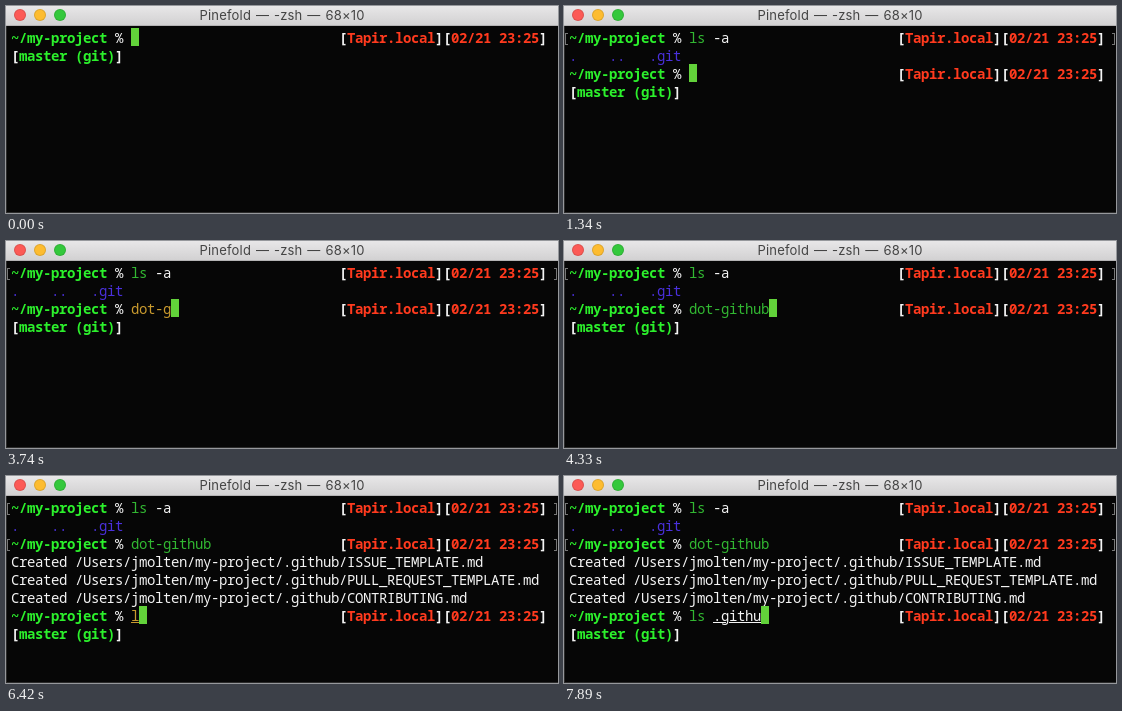
Animation of 552 by 207 pixels, one loop 8000 ms. Source, as an HTML page:

```html
<!DOCTYPE html>
<html lang="en">
<head>
<meta charset="utf-8">
<title>Shell session</title>
<style>
  html, body { margin: 0; width: 100%; height: 100%; overflow: hidden; background: #060606; }
  .window { position: relative; width: 552px; height: 207px; overflow: hidden; background: #060606; }
  .window::after {
    content: ""; position: absolute; inset: 20px 0 0; pointer-events: none;
    border: solid #2b2b2b; border-width: 0 0 1px 1px;
  }
  .bar {
    position: absolute; left: 0; top: 0; width: 552px; height: 20px; box-sizing: border-box;
    background: linear-gradient(#e8e7e8, #d2d1d2); border-bottom: 1px solid #b4b3b4;
    font: 13px/19px Inter, "Open Sans", sans-serif; letter-spacing: .2px; word-spacing: 1px;
    color: #444; text-align: center;
  }
  .dot {
    position: absolute; top: 3px; width: 12px; height: 12px; box-sizing: border-box;
    border-radius: 50%; border: 1px solid rgba(0, 0, 0, .12);
  }
  .row {
    position: absolute; left: 0; width: 552px; height: 18px; color: #f4f4f4;
    font: 500 14px/18px "Noto Sans Mono", "DejaVu Sans Mono", monospace; letter-spacing: -.4px;
    font-variant-ligatures: none; white-space: pre;
  }
  .text { position: absolute; top: 1px; }
  .bold { font-weight: 700; }
  .prompt { color: #2cf02c; font-weight: 700; }
  .info { color: #ff3a1e; }
  .cmd { color: #32b832; }
  .part { color: #c99a2e; }
  .dir { color: #4a30dc; }
  .line { text-decoration: underline 1px; text-underline-offset: 1px; }
  .cursor { position: absolute; top: 0; width: 8px; height: 18px; background: #62d23a; }
  .mark { position: absolute; top: 5px; width: 2px; height: 10px; border: 1px solid #777; }
  .mark.l { left: 1px; border-right: 0; }
  .mark.r { left: 548px; border-left: 0; }
</style>
</head>
<body>
<div class="window">
  <div class="bar">
    <i class="dot" style="left:8px;background:#fc5a56"></i>
    <i class="dot" style="left:28px;background:#fdbc30"></i>
    <i class="dot" style="left:48px;background:#34c83c"></i>
    Pinefold — -zsh — 68×10
  </div>
  <div id="screen"></div>
</div>
<script>
const LOOP = 8000, LEFT = 5, TOP = 22, CELL = 8, LINE = 18, INPUT = 15;
const screen = document.getElementById("screen");

const span = (cls, s) => `<span class="${cls}">${s}</span>`;
const text = (col, html) => `<div class="text" style="left:${LEFT + col * CELL}px">${html}</div>`;
const cursor = col => `<i class="cursor" style="left:${LEFT + col * CELL}px"></i>`;
const marks = '<i class="mark l"></i><i class="mark r"></i>';

// Command colouring as the shell highlights it while typing
function highlight(s) {
  if (!s) return "";
  const [, word, gap, arg] = s.match(/^(\S+)(\s*)(.*)$/);
  const known = word === "ls" || word === "dot-github";
  const cls = known ? "cmd" : word.length === 1 ? "part line" : "part";
  return span(cls, word) + gap + (arg[0] === "." ? span("line", arg) : arg);
}

const prompt = s =>
  text(0, span("prompt", "~/my-project") + " % " + highlight(s)) +
  text(41, span("bold", `[${span("info", "Tapir.local")}][${span("info", "02/21 23:25")}]`));

const past = s => marks + prompt(s);
const live = s => [
  prompt(s) + cursor(INPUT + s.length),
  text(0, span("bold", `[${span("prompt", "master (git)")}]`))
];

const listed = [past("ls -a"), text(0, span("dir", ".    ..   .git"))];
const ran = [...listed, past("dot-github")];
const created = [...ran, ...["ISSUE_TEMPLATE", "PULL_REQUEST_TEMPLATE", "CONTRIBUTING"].map(
  name => text(0, `Created /Users/jmolten/my-project/.github/${name}.md`))];

const steps = [];
const type = (before, keys) => {
  for (const [t, s] of keys) steps.push([t, [...before, ...live(s)]]);
};

type([], [[0, ""], [300, "l"], [450, "ls"], [600, "ls "], [890, "ls -"], [1190, "ls -a"]]);
type(listed, [
  [1340, ""], [2990, "d"], [3140, "do"], [3290, "dot"], [3590, "dot-"], [3740, "dot-g"],
  [3880, "dot-gi"], [4030, "dot-gith"], [4180, "dot-githu"], [4330, "dot-github"]
]);
steps.push([4770, [...ran, cursor(0)]]);
type(created, [
  [4920, ""], [6420, "l"], [6570, "ls"], [6710, "ls "], [7160, "ls ."], [7300, "ls .g"],
  [7450, "ls .gi"], [7600, "ls .git"], [7740, "ls .gith"], [7890, "ls .githu"]
]);

let shown = -1;
const start = performance.now();

function draw() {
  const t = Math.max(0, performance.now() - start) % LOOP;
  const now = steps.filter(step => step[0] <= t).length - 1;
  if (now !== shown) {
    shown = now;
    screen.innerHTML = steps[now][1].map(
      (html, i) => `<div class="row" style="top:${TOP + i * LINE}px">${html}</div>`).join("");
  }
  requestAnimationFrame(draw);
}
draw();
</script>
</body>
</html>
```
